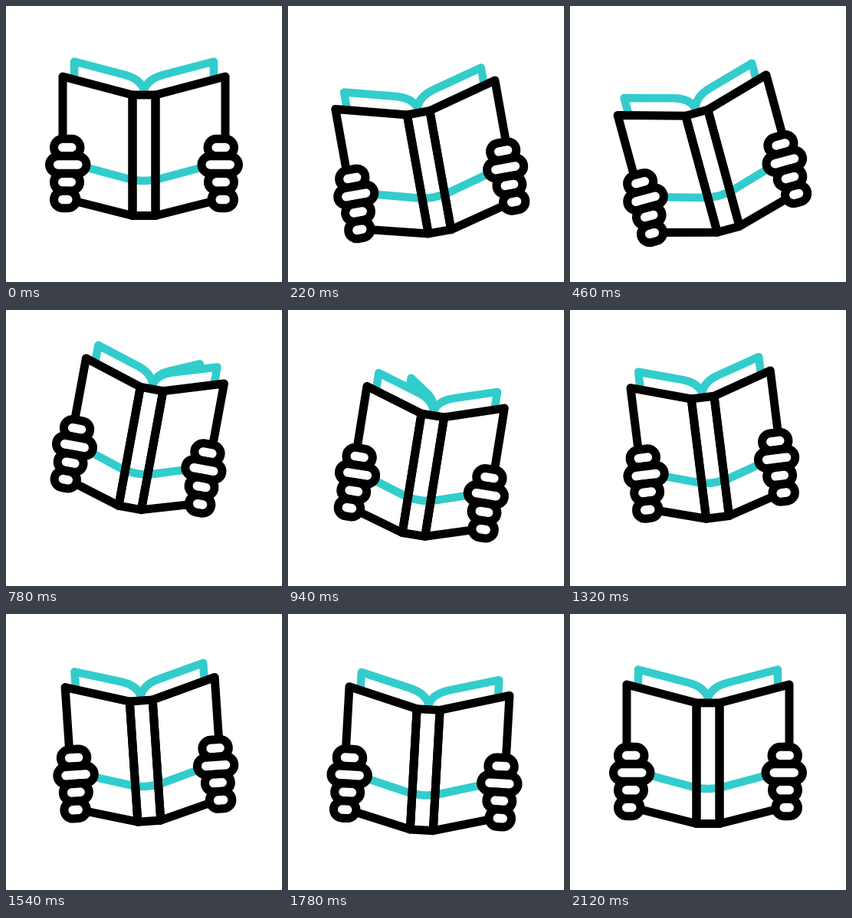
Recreate the animation shown at these times as an HTML page with a canvas. Size 360 by 360 pixels, loop 2400 ms.

```html
<!DOCTYPE html>
<html lang="en">
<head>
<meta charset="utf-8">
<title>Reading a book</title>
<style>
  html, body { margin: 0; width: 100%; height: 100%; overflow: hidden; background: #fff; }
  canvas { display: block; width: 360px; height: 360px; }
</style>
</head>
<body>
<canvas id="stage"></canvas>
<script>
const SIZE = 360, LOOP = 2400, STEP = 20;
const INK = '#000', TEAL = '#33cccc', PAPER = '#fff';
const PIVOT = { x: 180, y: 172 };
const SPINE = 15;

// [time, value] pairs, joined by sine easing
const TILT = [[0, 0], [390, -17], [820, 11], [1410, -8.2], [1720, 3.4], [2120, 0]];
const DROP = [[0, 0], [340, 31], [740, -16], [1040, 33], [1405, -7.5], [1790, 8.5], [2120, 0]];
const FOLD = [[0, 0], [160, 0], [880, 1], [1200, 1], [1920, 0]];
const TURN = [[0, 1], [680, 1], [1080, -1]];

// finger: left, right, middle height
const FINGERS = [
  [-117.5, -83, 12.5],
  [-123.5, -75, 35],
  [-117.5, -83.5, 57.7],
  [-117.5, -88, 80.5]
];

const canvas = document.getElementById('stage');
const ctx = canvas.getContext('2d');
const ratio = window.devicePixelRatio || 1;
canvas.width = canvas.height = SIZE * ratio;

function at(keys, t) {
  for (let i = 1; i < keys.length; i++) {
    const [t0, a] = keys[i - 1], [t1, b] = keys[i];
    if (t < t1) return a + (b - a) * (1 - Math.cos(Math.PI * (t - t0) / (t1 - t0))) / 2;
  }
  return keys[keys.length - 1][1];
}

// Narrows everything outside the spine
function foldX(x, k) {
  const d = Math.abs(x);
  return d <= SPINE ? x : Math.sign(x) * (SPINE + (d - SPINE) * k);
}

function line(color, width) {
  ctx.strokeStyle = color;
  ctx.lineWidth = width;
  ctx.stroke();
}

function pageEdge(dir, k, foot) {
  const x = v => dir * foldX(v, k);
  ctx.beginPath();
  ctx.moveTo(x(91), foot);
  ctx.lineTo(x(91), -99.5);
  ctx.lineTo(x(24), -82);
  ctx.bezierCurveTo(x(10), -78, x(3), -71, 0, -63);
}

function page(dir, k) {
  pageEdge(dir, k, -60);
  ctx.lineTo(0, -40);
  ctx.lineTo(dir * foldX(91, k), -40);
  ctx.fillStyle = PAPER;
  ctx.fill();
  pageEdge(dir, k, -78);
  line(TEAL, 10.5);
}

function wing(dir, k) {
  const edge = dir * foldX(106, k);
  ctx.beginPath();
  ctx.moveTo(dir * SPINE, -56);
  ctx.lineTo(edge, -80);
  ctx.lineTo(edge, 78.5);
  ctx.lineTo(dir * SPINE, 101.5);
  ctx.closePath();
}

function pageFoot(k) {
  ctx.beginPath();
  ctx.moveTo(foldX(-100, k), 32);
  ctx.lineTo(foldX(-20, k), 53.5);
  ctx.quadraticCurveTo(-10, 56, 0, 56);
  ctx.quadraticCurveTo(10, 56, foldX(20, k), 53.5);
  ctx.lineTo(foldX(100, k), 32);
  line(TEAL, 10.5);
}

function hand(dir, shift) {
  ctx.save();
  ctx.scale(dir, 1);
  ctx.translate(shift, 0);
  const r = 11.25;
  for (const [left, right, y] of FINGERS) {
    ctx.beginPath();
    ctx.arc(left + r, y, r, Math.PI / 2, Math.PI * 1.5);
    ctx.arc(right - r, y, r, -Math.PI / 2, Math.PI / 2);
    ctx.closePath();
    ctx.fillStyle = PAPER;
    ctx.fill();
    line(INK, 11);
  }
  ctx.restore();
}

function draw(t) {
  const fold = at(FOLD, t), turn = at(TURN, t);
  const k = 1 - 0.167 * fold;

  ctx.setTransform(ratio, 0, 0, ratio, 0, 0);
  ctx.fillStyle = PAPER;
  ctx.fillRect(0, 0, SIZE, SIZE);
  ctx.lineJoin = ctx.lineCap = 'round';
  ctx.translate(PIVOT.x, PIVOT.y + at(DROP, t));
  ctx.rotate(at(TILT, t) * Math.PI / 180);

  if (Math.abs(turn) < 1) {
    pageEdge(turn, k, -60);
    line(TEAL, 10.5);
  }
  page(-1, k);
  page(1, k);

  ctx.fillStyle = PAPER;
  for (const dir of [-1, 1]) {
    wing(dir, k);
    ctx.fill();
  }
  ctx.fillRect(-SPINE, -56, SPINE * 2, 157.5);
  pageFoot(k);

  for (const dir of [-1, 1]) {
    wing(dir, k);
    line(INK, 11);
  }
  ctx.beginPath();
  ctx.rect(-SPINE, -56, SPINE * 2, 157.5);
  line(INK, 11);

  hand(-1, 14.3 * fold);
  hand(1, 14.3 * fold);
}

function frame() {
  const t = performance.now() % LOOP;
  draw(Math.floor(t / STEP) * STEP);
  requestAnimationFrame(frame);
}
frame();
</script>
</body>
</html>
```
